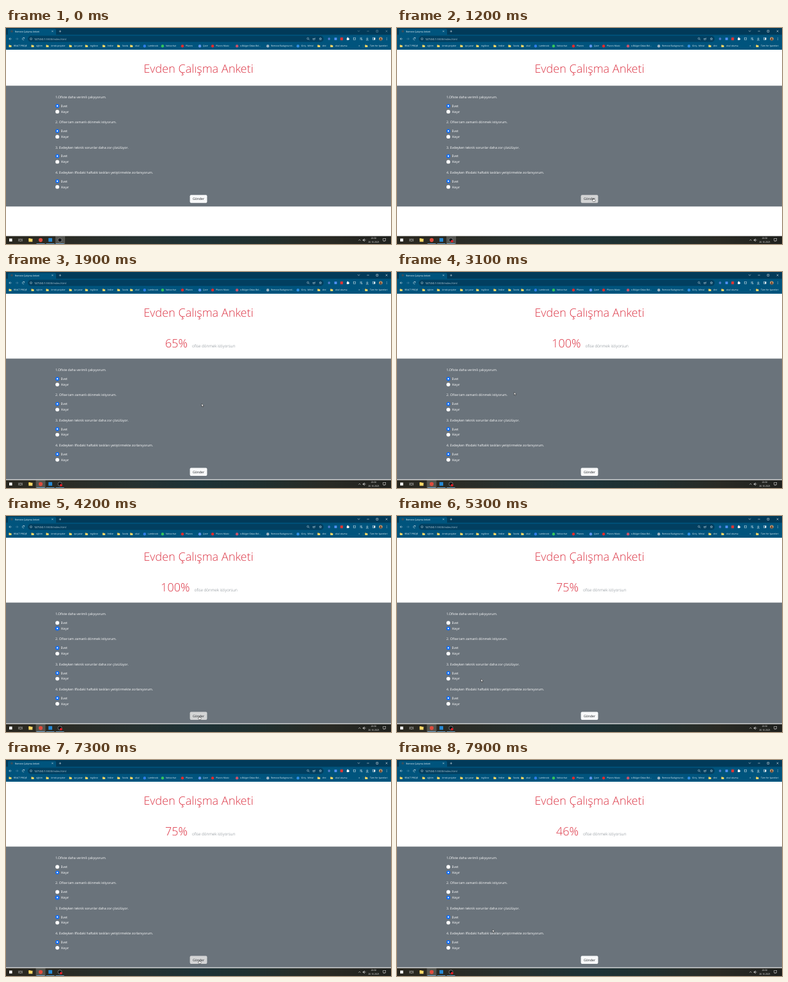
Animation, 600 px wide and 338 px high, one loop 8 s. Source, as an HTML page:

```html
<!DOCTYPE html>
<html lang="tr">
<head>
<meta charset="utf-8">
<title>Remote Çalışma Anketi</title>
<style>
html, body { margin: 0; width: 100%; height: 100%; overflow: hidden; background: #fff; }
svg { position: absolute; left: 0; top: 0; width: 600px; height: 338px; }
text { font-family: "Open Sans", "Noto Sans", sans-serif; white-space: pre; text-rendering: geometricPrecision; }
</style>
</head>
<body>
<svg id="stage" viewBox="0 0 600 338"></svg>
<script>
const LOOP = 8000, SHIFT = 45.2, ROW = 39.25;
const RED = '#dc3545', GREY = '#6c757d';
const LIGHT = { 'font-weight': 300 }, MID = { 'text-anchor': 'middle' };
const stage = document.getElementById('stage');
let parent = stage;

// ---------- drawing helpers ----------
function node(tag, attrs, into = parent) {
  const el = document.createElementNS('http://www.w3.org/2000/svg', tag);
  for (const k in attrs) el.setAttribute(k, attrs[k]);
  into.appendChild(el);
  return el;
}
function group(draw) {
  const outer = parent, g = node('g', {});
  parent = g;
  draw();
  parent = outer;
  return g;
}
function show(el, on) {
  el.setAttribute('visibility', on ? 'visible' : 'hidden');
}
function label(str, x, y, size, fill = '#fff', extra = {}) {
  const el = node('text', { x, y, 'font-size': size, fill, ...extra });
  el.textContent = str;
  return el;
}
const box = (x, y, width, height, fill, rx = 0) => node('rect', { x, y, width, height, fill, rx });
const disc = (cx, cy, r, fill) => node('circle', { cx, cy, r, fill });
const ring = (cx, cy, r, stroke, w) =>
  node('circle', { cx, cy, r, fill: 'none', stroke, 'stroke-width': w });
const line = (stroke, w, ...pts) =>
  node('polyline', { points: pts.join(' '), fill: 'none', stroke, 'stroke-width': w });
const frame = (x, y, width, height, stroke, w) =>
  node('rect', { x, y, width, height, fill: 'none', stroke, 'stroke-width': w });
const curve = (d, stroke, w) => node('path', { d, fill: 'none', stroke, 'stroke-width': w });

function folder(x, y, s = 1) {
  box(x - 2 * s, y - 2 * s, 2 * s, 1.5 * s, '#e5b73e', .3);
  box(x - 2 * s, y - 1.4 * s, 4 * s, 3.2 * s, '#ffd968', .4);
}

// ---------- page ----------
box(0, 0, 600, 338, '#fff');

const questions = [
  '1.Ofiste daha verimli çalışıyorum.',
  '2. Ofise tam zamanlı dönmek istiyorum.',
  '3. Evdeyken teknik sorunlar daha zor çözülüyor.',
  '4. Evdeyken Iflodaki haftalık taskları yetiştirmekte zorlanıyorum.'
];
function radio(x, y, str) {
  label(str, 85.5, y + 1.9, 5.15);
  const glow = disc(x, y, 4.1, 'rgba(13,110,253,.3)');
  const fill = disc(x, y, 2.95, '#fff');
  disc(x, y, 1.15, '#fff');
  return { glow, fill };
}
function setRadio(r, on, focus) {
  r.fill.setAttribute('fill', on ? '#0d6efd' : '#fff');
  show(r.glow, focus);
}

let rows, button;
const form = group(() => {
  box(0, 90.3, 600, 189, '#6a737b');
  rows = questions.map((q, i) => {
    const y = i * ROW;
    label(q, 77, 110 + y, 5.15);
    return [radio(80, 122 + y, 'Evet'), radio(80, 130.9 + y, 'Hayır')];
  });
  button = box(286.6, 261.3, 26.8, 12.4, '#f8f9fa', 1.9);
  label('Gönder', 300, 269.4, 5.15, '#212529', MID);
});

label('Evden Çalışma Anketi', 300, 70, 18, RED, { ...LIGHT, ...MID });
let percent, verdict;
const result = group(() => {
  percent = label('', 283, 118, 18, RED, { ...LIGHT, 'text-anchor': 'end' });
  verdict = label('ofise dönmek istiyorsun', 290, 118, 6.3, GREY, LIGHT);
});

// ---------- browser ----------
const pale = '#e9f1f5', faint = '#5f92ae';
box(0, 0, 600, 11, '#023a59');
box(3, 1.5, 75, 11, '#00547d', 2);
box(0, 10.5, 600, 23.5, '#00547d');
disc(9, 5.2, 1.9, '#35505f');
label('Remote Çalışma Anketi', 14, 6.5, 3.55);
curve('M71.3 4.1l2.2 2.2m0-2.2l-2.2 2.2M82.6 5.2h3.4m-1.7-1.7v3.4', pale, .5);
const controls = curve(
  'M548 4l1.7 1.6l1.7-1.6M562.5 5h3.3M577 3.6h2.8v2.8h-2.8zM591.7 3.6l2.8 2.8m0-2.8l-2.8 2.8', '#fff', .5);

box(34, 12.3, 461, 9.4, '#023f60', 4.7);
label('127.0.0.1', 44, 18.6, 4.12);
label(':5500/index.html', 61.5, 18.6, 4.12, '#b4cbd8');
curve('M8.6 17h-3.8m1.8-1.8l-1.8 1.8l1.8 1.8', pale, .55);
curve('M15 17h3.8m-1.8-1.8l1.8 1.8l-1.8 1.8', faint, .55);
curve('M28.4 18a1.7 1.7 0 1 1-.1-2.1', pale, .5);
box(27.4, 15, 1.4, 1.2, pale);
ring(39, 17, 1.6, pale, .4);
line(pale, .4, 39, 16.7, 39, 18);

ring(470.5, 16.5, 1.4, pale, .45);
line(pale, .5, 471.5, 17.5, 472.8, 18.8);
frame(478.8, 16.5, 3, 2.2, pale, .4);
line(pale, .4, 480, 17.4, 482, 15.2);
const star = Array.from({ length: 11 }, (_, i) => {
  const a = i * Math.PI / 5 - Math.PI / 2, r = i % 2 ? .9 : 2;
  return [490 + r * Math.cos(a), 17 + r * Math.sin(a)];
});
line(pale, .45, ...star.flat());
disc(503.5, 17, 1.9, '#4b79c9');
box(511.7, 15, 4, 4, '#4d8ff0', .4);
box(521, 14.8, 4.2, 4.4, '#d93636', .4);
box(531, 15.6, 3.3, 3.3, '#fff', .4);
disc(532.6, 15.4, .8, '#fff');
disc(534.5, 17.2, .8, '#fff');
frame(541.6, 15.3, 3.2, 3.2, pale, .5);
curve('M551.6 15.5h3.4m-3.4 1.3h3.4m-3.4 1.3h1.9', pale, .5);
disc(554.6, 18.2, .7, pale);
curve('M563 14.8v2.9m-1.4-1.3l1.4 1.4l1.4-1.4M561 19h4', pale, .6);
frame(571.5, 15.2, 3.6, 3.4, pale, .5);
box(573.4, 15.2, 1.7, 3.4, '#fff');
disc(584, 17, 2.7, '#d9a06d');
disc(584, 16.3, 1, '#4b3028');
box(582.4, 17.5, 3.2, 1.7, '#4b3028', .8);
for (let i = -1; i < 2; i++) disc(593.3, 17 + i * 1.5, .45, pale);

// [label, text x, icon colour (absent = folder)]
const bookmarks = [
  ['REACT PROJE', 12], ['eğitim', 47], ['örnek projeler', 70], ['işe yarar', 106],
  ['ingilizce', 131], ['linkler', 158], ['Sevda', 181], ['okul', 201],
  ['Lumbrook', 221, '#2f7de8'], ['Nelvochat', 249, '#35c65a'], ['Plivoro', 280, '#e62a2a'],
  ['Çevir', 307, '#5b95ee'], ['Plivoro Music', 327, '#e62a2a'],
  ['e-Bülger Odası Bel...', 365, '#c9536a'], ['Remove Background...', 413, '#9fb4c2'],
  ['Giriş - Mirtal', 460, '#2f8fe6'], ['dini', 493], ['okul okuma', 513],
  ['Tüm Yer İşaretleri', 567]
];
for (const [str, x, color] of bookmarks) {
  if (color) disc(x - 5, 28.2, 2.2, color);
  else folder(x - 5.5, 28.3);
  label(str, x, 29.4, 3.4);
}
label('»', 549.5, 29.4, 4);
line('#4f839e', .3, 556.5, 25.5, 556.5, 31);

// ---------- taskbar ----------
const shade = node('linearGradient', { id: 'shade' });
['#29271f', '#2b2c26', '#263130', '#1d3236', '#21302f', '#2a2a24', '#1f211e']
  .forEach((c, i, a) => node('stop', { offset: i / (a.length - 1), 'stop-color': c }, shade));
box(0, 325.6, 600, 12.4, 'url(#shade)');
const highlight = box(77, 325.6, 15, 12.4, 'rgba(255,255,255,.2)');
[54, 69, 84].forEach(x => box(x - 6.5, 337.2, 13, .8, '#76b9ed'));
box(5, 329.5, 4.6, 4.6, '#fff');
frame(21, 330.2, 3, 3.2, '#ddd', .5);
curve('M19.7 329.7v4.3m5.6-4.3v4.3', '#ddd', .5);
folder(38.3, 331.9, 1.5);
disc(54, 331.8, 3.1, '#df4b3c');
box(66.2, 328.8, 5.8, 5.8, '#2489d6', .5);
disc(84, 331.8, 3.2, '#111214');
ring(84, 331.8, 3.1, '#c9cbcc', .5);
const recDot = disc(85.8, 333.6, 1.9, '#e81b23');
line('#fff', .5, 549.3, 332.7, 551, 331, 552.7, 332.7);
box(556.2, 331, 1.2, 1.8, '#fff');
line('#fff', .5, 557.2, 331, 558.5, 330, 558.5, 333.8, 557.2, 332.8);
curve('M559.8 330.7q.9 1.2 0 2.4', '#fff', .4);
label('22:02', 573, 330.4, 3.4, '#fff', MID);
label('20.10.2023', 573, 336.3, 3.35, '#fff', MID);
frame(587.8, 329.6, 4, 3.4, '#fff', .45);
line('#fff', .45, 589, 333, 589, 334.2, 590.2, 333);

// ---------- pointer ----------
const ink = { fill: '#fff', stroke: '#111', 'stroke-width': .45, 'stroke-linejoin': 'round' };
const arrow = node('path', { d: 'M0 0V4.6L1.1 3.6L1.9 5.3L2.7 4.9L1.9 3.3H3.3Z', ...ink });
const hand = node('path', {
  d: 'M-.5 .4Q0 -.5 .5 .4V2L2.7 2.6Q3.2 2.9 3 3.8L2.4 5.6H-.5L-1.9 3.3Q-1.6 2.5 -.5 3.2Z', ...ink
});

// ---------- timeline ----------
const path = [
  [300, 420, 300], [900, 309, 270], [1000, 306, 266], [1700, 306, 266], [1900, 305, 206],
  [2400, 267, 197], [2750, 267, 197], [3500, 80, 177], [3750, 80, 177], [4150, 301, 313],
  [4400, 301, 313], [5300, 131, 255], [5400, 116, 250], [5850, 80, 214], [6100, 80, 214],
  [6300, 91, 223], [6500, 95, 214], [7200, 298, 302], [7300, 301, 313], [7450, 301, 313],
  [7900, 149, 265], [8000, 149, 265]
];
// submit time and final score
const submits = [[1245, 100], [4290, 75], [7435, 50]];
// when the answer turns to "Hayır", by question
const changes = [3650, 6000, Infinity, Infinity];

function pointer(t) {
  const i = path.findIndex(p => p[0] > t);
  if (i < 1) return null;
  const [t0, x0, y0] = path[i - 1], [t1, x1, y1] = path[i];
  const u = (t - t0) / (t1 - t0), e = u * u * (3 - 2 * u);
  return [x0 + (x1 - x0) * e, y0 + (y1 - y0) * e];
}

function render(t) {
  const last = submits.filter(s => t >= s[0]).pop();
  const sent = last ? last[0] : 0;
  const pos = pointer(t);
  const dy = last ? SHIFT : 0;
  const hover = !!pos && Math.abs(pos[0] - 300) < 13.4 && Math.abs(pos[1] - dy - 267.5) < 6.2;

  form.setAttribute('transform', `translate(0 ${dy})`);
  button.setAttribute('fill', hover ? '#d3d4d5' : '#f8f9fa');
  rows.forEach(([yes, no], i) => {
    const off = t >= changes[i];
    setRadio(yes, !off, false);
    setRadio(no, off, off && sent < changes[i]);
  });

  show(result, !!last);
  if (last) {
    const n = Math.min(last[1], Math.floor((t - sent) / 10));
    const slide = (String(n).length - 2) * 3.5;
    percent.textContent = n + '%';
    percent.setAttribute('x', 283 + slide);
    verdict.setAttribute('x', 290 + slide);
  }

  controls.setAttribute('opacity', t < 1150 ? .5 : 1);
  highlight.setAttribute('x', t < 1300 ? 77 : 46.5);
  show(recDot, t >= 500);

  show(arrow, pos && !hover);
  show(hand, hover);
  if (pos) [arrow, hand].forEach(el => el.setAttribute('transform', `translate(${pos[0]} ${pos[1]})`));
}

const start = performance.now();
function tick() {
  render((performance.now() - start) % LOOP);
  requestAnimationFrame(tick);
}
tick();
</script>
</body>
</html>
```
